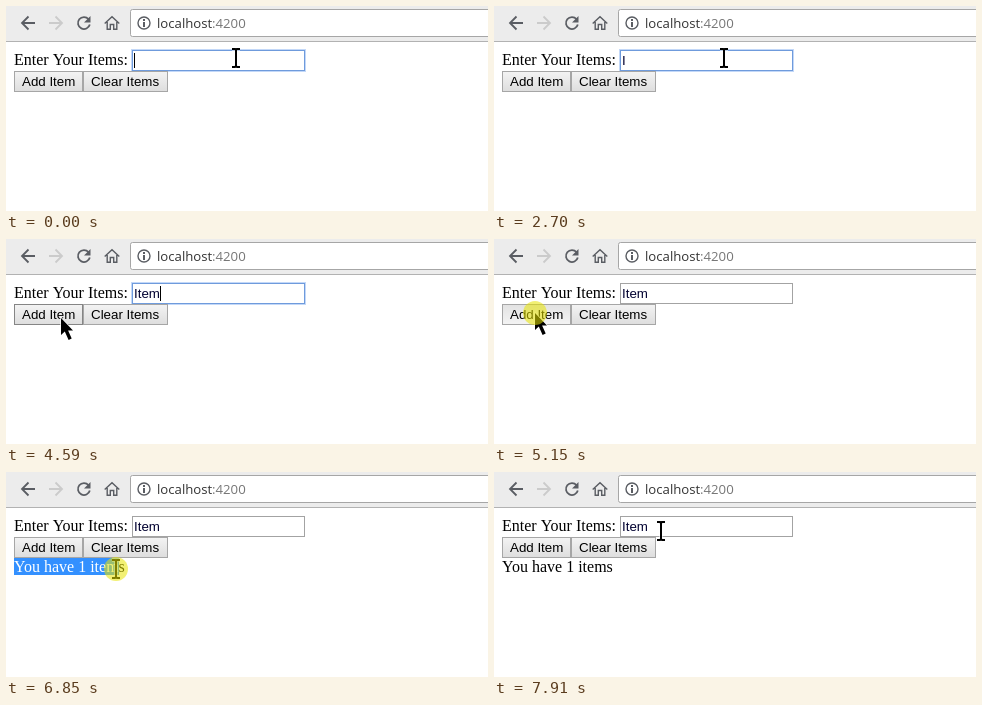
Recreate the animation shown at these times as an HTML page with a canvas. Size 482 px wide and 205 px high, loop 8000 ms.

```html
<!DOCTYPE html>
<html lang="en">
<head>
<meta charset="utf-8">
<style>
html, body { margin: 0; width: 100%; height: 100%; overflow: hidden; background: #fff; }
canvas { display: block; }
</style>
</head>
<body>
<canvas id="stage" width="482" height="205"></canvas>
<script>
const ctx = document.getElementById('stage').getContext('2d', { alpha: false });
const LOOP = 8000;
const BLINK = 530;
const SERIF = '16px "Liberation Serif", serif';
const SANS = '13.333px "Liberation Sans", sans-serif';
const URL_FONT = '13.2px "Open Sans", sans-serif';
const ICON = '#5a5d63';

// Pointer moves: start, end, x, y
const moves = [
  [4190, 4830, 41, 81],
  [4980, 4990, 41, 74],
  [5620, 6080, 18, 95],
  [6160, 6320, 6, 96],
  [6620, 6850, 110, 97],
  [7160, 7230, 133, 97],
  [7690, 7910, 167, 59]
];
const presses = [[5150, 5300], [6540, 7080], [7310, 7460]];

const inside = (x, y, l, t, r, b) => x >= l && x < r && y >= t && y < b;

// The pointer eases out in steps of about 77 ms
function pointerAt(t) {
  let x = 230, y = 52;
  for (const [start, end, toX, toY] of moves) {
    if (t < start) break;
    const steps = Math.round((end - start) / 77);
    const step = Math.min(steps, Math.floor((t - start) / (end - start) * steps + 1e-6));
    const eased = 1 - (1 - (step + 1) / (steps + 1)) ** 2.37;
    x += (toX - x) * eased;
    y += (toY - y) * eased;
  }
  return [Math.round(x), Math.round(y)];
}

// Typed text, and the time of the last key, which restarts the blinking
function typingAt(t) {
  if (t < 2170) return ['', -80];
  if (t < 2870) return ['I', 2170];
  const keys = Math.min(2, Math.floor((t - 2870) / 150));
  return ['Item'.slice(0, keys + 2), 2870 + keys * 150];
}

function rect(x, y, w, h, color) {
  ctx.fillStyle = color;
  ctx.fillRect(x, y, w, h);
}

function frame(x, y, w, h, color) {
  ctx.strokeStyle = color;
  ctx.lineWidth = 1;
  ctx.strokeRect(x + .5, y + .5, w - 1, h - 1);
}

function text(str, x, y, font, color = '#000') {
  ctx.font = font;
  ctx.fillStyle = color;
  ctx.fillText(str, x, y);
}

function line(d, color, width = 1.8) {
  ctx.strokeStyle = color;
  ctx.lineWidth = width;
  ctx.stroke(new Path2D(d));
}

function disc(x, y, r, color) {
  ctx.fillStyle = color;
  ctx.beginPath();
  ctx.arc(x, y, r, 0, 7);
  ctx.fill();
}

function toolbar() {
  rect(0, 0, 482, 35, '#ececec');
  rect(0, 35, 482, 1, '#b2b2b2');
  ctx.fillStyle = '#fff';
  ctx.strokeStyle = '#a6a6a6';
  ctx.lineWidth = 1;
  ctx.beginPath();
  ctx.roundRect(124.5, 3.5, 380, 27, 2);
  ctx.fill();
  ctx.stroke();

  line('M29 17H16.5M22.5 10.5L16 17L22.5 23.5', ICON);
  line('M43 17H55.5M49.5 10.5L56 17L49.5 23.5', '#cbcbcb');
  line('M82.6 13.2A6 6 0 1 0 83.8 18.5', ICON);
  ctx.fillStyle = ICON;
  ctx.fill(new Path2D('M84.5 10V16.5H78Z'));
  line('M98.7 17.6L106 10.7L113.3 17.6M101.2 16V23.2H104.3V18.5H107.7V23.2H110.8V16', ICON, 1.4);
  line('M132 17A6 6 0 1 1 144 17A6 6 0 1 1 132 17', ICON, 1.4);
  rect(137, 13, 2, 2, ICON);
  rect(137, 16, 2, 5, ICON);

  text('localhost', 151, 22, URL_FONT, '#333');
  text(':4200', 206, 22, URL_FONT, '#777');
}

function button(label, x, w, hover, pressed) {
  const fill = ctx.createLinearGradient(0, 65, 0, 86);
  fill.addColorStop(0, pressed ? '#e2e2e2' : '#f4f4f4');
  fill.addColorStop(1, pressed ? '#f4f4f4' : '#dddddd');
  rect(x, 65, w, 21, fill);
  frame(x, 65, w, 21, hover && !pressed ? '#858585' : '#a6a6a6');
  text(label, x + 8, 80, SANS);
}

function input(t) {
  const focused = t < 5150;
  const [value, lastKey] = typingAt(t);
  if (focused) frame(125, 43, 175, 23, '#c3d8f8');
  frame(126, 44, 173, 21, focused ? '#6f9bdc' : '#a3a3a3');
  text(value, 128, 59, SANS, '#000030');
  if (focused && Math.floor((t - lastKey) / BLINK) % 2 === 0) {
    rect(128 + Math.floor(ctx.measureText(value).width + .4), 47, 1, 15, '#000');
  }
}

function status(t, x) {
  if (t < 5300) return;
  const str = 'You have 1 items';
  text(str, 8, 100, SERIF);
  if (t < 6620 || t >= 7310) return;
  // Selection ends on the letter boundary nearest the pointer
  let end = 0;
  for (let i = 1; i <= str.length; i++) {
    const w = ctx.measureText(str.slice(0, i)).width;
    if (8 + w <= x + 3) end = w;
  }
  ctx.save();
  ctx.beginPath();
  ctx.rect(8, 86, Math.round(end), 17);
  ctx.clip();
  rect(8, 86, 120, 17, '#3390ff');
  text(str, 8, 100, SERIF, '#fff');
  ctx.restore();
}

function cursor(x, y, beam) {
  ctx.save();
  ctx.translate(x, y);
  if (beam) {
    const shape = 'M-4 -9H-1L0 -8L1 -9H4M-4 9H-1L0 8L1 9H4M0 -8V8';
    line(shape, '#fff', 3);
    line(shape, '#000', 2);
  } else {
    const shape = 'M0 0V17L3.8 13.6L7.6 22L10.7 20.6L7.1 12.6H12Z';
    line(shape, '#fff', 1.4);
    ctx.fillStyle = '#000';
    ctx.fill(new Path2D(shape));
  }
  ctx.restore();
}

function draw(now) {
  const t = now % LOOP;
  const [x, y] = pointerAt(t);
  const pressed = presses.some(([start, end]) => t >= start && t < end);
  const overAdd = inside(x, y, 8, 65, 77, 86);
  const overClear = inside(x, y, 77, 65, 162, 86);
  const overText = inside(x, y, 126, 44, 299, 65) || inside(x, y, 0, 86, 120, 104);

  rect(0, 0, 482, 205, '#fff');
  toolbar();
  text('Enter Your Items:', 8, 59, SERIF);
  input(t);
  button('Add Item', 8, 69, overAdd, overAdd && pressed);
  button('Clear Items', 77, 85, overClear, false);
  status(t, x);
  cursor(x, y, overText);
  if (pressed) disc(x, y, 12, 'rgba(232, 228, 0, .55)');
  requestAnimationFrame(draw);
}
requestAnimationFrame(draw);
</script>
</body>
</html>
```
